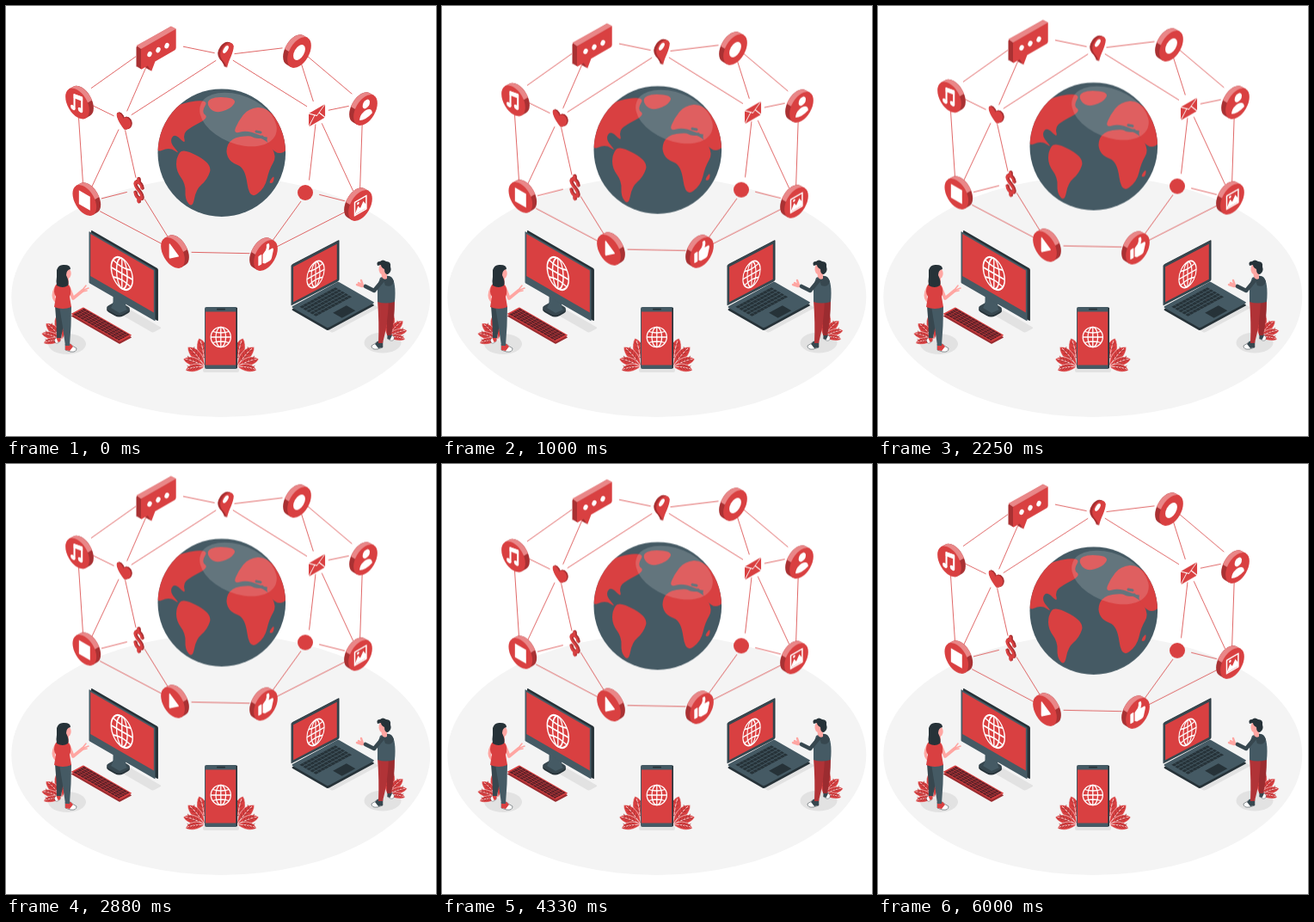
Recreate the animation shown at these times as an HTML page. Size 500 by 500 pixels, loop 6040 ms.

```html
<!DOCTYPE html>
<html lang="en">
<head>
<meta charset="utf-8">
<title>Connected world</title>
<style>
html, body { margin: 0; width: 100%; height: 100%; overflow: hidden; background: #fff; }
svg { display: block; width: 100vw; height: 100vh; }
</style>
</head>
<body>
<svg id="stage" viewBox="0 0 500 500" xmlns="http://www.w3.org/2000/svg"></svg>
<script>
const RED = '#d94041', DEEP = '#a93133', PINK = '#e98788', WINE = '#9b2c30';
const SLATE = '#455a64', DARK = '#37474f', INK = '#263238', SKIN = '#ffa6a2', SHADE = '#e2e2e2';
const LOOP = 6040, RISE = 10;

const path = (d, fill, extra = '') => `<path d="${d}" fill="${fill}" ${extra}/>`;
const line = (d, color, width, extra = '') =>
  path(d, 'none', `stroke="${color}" stroke-width="${width}" stroke-linecap="round" stroke-linejoin="round" ${extra}`);
const rect = (x, y, w, h, fill, r = 0) =>
  `<rect x="${x}" y="${y}" width="${w}" height="${h}" rx="${r}" fill="${fill}"/>`;
const oval = (x, y, rx, ry, fill, turn = 0, extra = '') =>
  `<ellipse cx="${x}" cy="${y}" rx="${rx}" ry="${ry}" fill="${fill}" transform="rotate(${turn} ${x} ${y})" ${extra}/>`;
const group = (transform, body) => `<g transform="${transform}">${body}</g>`;
const repeat = (n, make) => Array.from({ length: n }, (_, i) => make(i)).join('');

// The three isometric planes: two upright faces and the ground.
const left = (x, y) => `matrix(.866 .5 0 1 ${x} ${y})`;
const right = (x, y) => `matrix(.866 -.5 0 1 ${x} ${y})`;
const flat = (x, y) => `matrix(.87 -.47 .87 .5 ${x} ${y})`;

// Solid body: dark copies stepping back from a red face.
const solid = (plane, x, y, dx, dy, shape) =>
  repeat(6, i => group(plane(x + dx * (1 - i / 5), y + dy * (1 - i / 5)), shape(i < 5 ? DEEP : RED)));

// Closed smooth outline that bends towards each key point.
function blob(text, fill) {
  const p = text.split(' ').map(s => s.split(',').map(Number));
  const mid = i => p[i].map((v, k) => (v + p[(i + 1) % p.length][k]) / 2).join(' ');
  return path(`M${mid(p.length - 1)}` + p.map((q, i) => `Q${q.join(' ')} ${mid(i)}`).join('') + 'Z', fill);
}

/* ---------- globe ---------- */
const lands = [
  '172,172 176,128 205,112 236,109 227,123 236,130 213,142 206,149 209,161 196,148 190,158 203,173 190,164',
  '232,111 245,105 269,108 261,120 241,125',
  '198,176 206,165 240,184 234,202 221,213 217,235 208,225 209,207 198,192',
  '255,169 261,154 284,150 304,156 315,175 306,190 301,212 283,225 278,188 261,182',
  '299,153 320,140 330,166 315,174',
  '264,149 270,134 282,119 303,117 328,145 308,156 281,144',
  '305,206 312,196 311,206'
];
const globe = `
  <clipPath id="disc"><circle cx="250.8" cy="170.7" r="74.3"/></clipPath>
  <circle cx="250.8" cy="170.7" r="74.3" fill="${SLATE}"/>
  <g clip-path="url(#disc)">
    ${lands.map(c => blob(c, RED)).join('')}
    ${line('M284 149Q291 154 298 152M291 146L296 147', SLATE, 3)}
    ${oval(270, 132, 47, 28, '#fff', 22, 'opacity=".16"')}
  </g>`;

/* ---------- links ---------- */
// Each node: place the lines aim at, and the clear radius around it.
const nodes = {
  bubble: [176, 41, 31], pin: [254, 57, 12], friend: [337, 47, 16], user: [415, 113, 17],
  mail: [361.5, 124, 14], photo: [411, 231, 18], bird: [351, 216, 14], like: [299, 288, 16],
  play: [199, 286, 17], dollar: [154, 213, 14], square: [91, 229, 21], music: [83, 107, 20], heart: [136, 133, 12]
};
const links = ['bubble pin music heart', 'pin friend mail heart', 'friend mail user', 'user mail photo',
  'mail photo bird', 'bird photo like', 'like photo play', 'play dollar square', 'square dollar heart music',
  'heart dollar music'];

function link(a, b) {
  const [ax, ay, ar] = nodes[a], [bx, by, br] = nodes[b];
  const d = Math.hypot(bx - ax, by - ay), at = s => `${ax + (bx - ax) * s / d} ${ay + (by - ay) * s / d}`;
  return `M${at(ar)}L${at(d - br)}`;
}
const web = links.map(row => {
  const [from, ...ends] = row.split(' ');
  return ends.map(to => link(from, to)).join('');
}).join('');

/* ---------- coins ---------- */
const R = 16, BACK = 5.8;
function rim(from, to, fill) {
  const at = (deg, push) => {
    const a = deg * Math.PI / 180;
    return `${R * Math.cos(a) + push} ${R * Math.sin(a) - push}`;
  };
  return path(`M${at(from, 0)}L${at(from, BACK)}A${R} ${R} 0 0 1 ${at(to, BACK)}L${at(to, 0)}Z`, fill);
}
const blank = rim(-135, 45, DEEP) + rim(-135, -30, PINK) + `<circle r="${R}" fill="${RED}"/>`;
const coinLeft = (x, y, icon) => group(left(x, y), blank + icon);
const coinRight = (x, y, icon) => group(right(x, y), group('scale(-1 1)', blank) + icon);

const note = line('M-4 7V-8L6-10V5', '#fff', 2.4) + path('M-5-9L7-11V-6L-5-4Z', '#fff') +
  oval(-6, 7.5, 3.2, 2.7, '#fff') + oval(4, 5.5, 3.2, 2.7, '#fff');
const person = oval(1, -6.5, 4.8, 4.8, '#fff') + path('M-8 8C-8-2 9-2 9 8Q0 12-8 8Z', '#fff');
const picture = line('M-7.500-7.500H8V8H-7.500Z', '#fff', 1.7) +
  path('M-7 6L-3-1L0 3L4-3L8 3V7H-7Z', '#fff') + oval(-3, -4, 1.5, 1.5, '#fff');
const thumb = rect(-10, -4, 4.6, 11.5, '#fff', 1) +
  path('M-4 7V-3L0-6Q1.500-8 1-12Q5-14 5-8L4-4H9Q11-3 10 0L8 7Q7.500 9 5 9H-1Z', '#fff');

const coins = coinLeft(83, 113.5, note) + coinLeft(91.3, 226, rect(-7.5, -8, 15, 16, '#fff')) +
  coinLeft(194, 287, line('M-4-7.500L7 0L-4 7.500Z', '#fff', 2, 'style="fill:#fff"')) +
  coinRight(341, 54, oval(0, 0, 8, 8, '#fff')) + coinRight(418, 121, person) +
  coinRight(412, 232, picture) + coinRight(302, 290, thumb);

/* ---------- loose icons ---------- */
const bubble = solid(right, 157, 50, -5.5, -3, c => path('M1 0H46Q47 0 47 1V22Q47 24 45 24H19L14 33L9 24H1Q0 24 0 23V1Z', c)) +
  path('M151.500 46L192 23.500L198 26.500L157 50Z', PINK) +
  repeat(3, i => oval(167 + 10 * i, 56 - 4.9 * i, 2.5, 3.4, '#fff', 24));
const pin = solid(right, 257, 52, -3, -1, c => path('M0 20C-2 11-9 7-9-1A9.500 10.500 0 0 1 9-1C9 7 2 12 0 20Z', c)) +
  oval(255.5, 50.5, 2.3, 5, '#fff', 32);
const heart = solid(left, 136.5, 135, 1.5, -.7, c =>
  path('M1 8C-4 5-9 0-9-4C-9-9-2-9 0-4C2-9 10-9 10-3C10 2 6 6 1 8Z', c));
const dollar = solid(left, 153.8, 214.5, 1.5, -.7, c =>
  line('M4.500-5C4-11-4.500-10-4.500-5C-4.500 0 4.500 0 4.500 5.500C4.500 10.500-4 10.500-4.500 5M0-13V-9M0 9.500V13', c, 3.4));
const mail = group(right(352, 125), rect(0, 0, 22, 15.5, RED, 1) + line('M0 0L11 8L22 0M0 15.500L8 6M22 15.500L14 6', '#fff', 1));

const network = line(web, RED, .8) + globe + coins + bubble + pin + heart + dollar + mail + oval(348, 217, 9, 9, RED);

/* ---------- devices ---------- */
const wire = `<g fill="none" stroke="#fff" stroke-width="1.300"><circle r="11.600"/><ellipse rx="5.800" ry="11.600"/>
  <path d="M0-11.600V11.600M-11.600 0H11.600M-9.500-6.500Q0-3.500 9.500-6.500M-9.500 6.500Q0 3.500 9.500 6.500"/></g>`;
const keys = (d, color, width) =>
  line(d, color, width, 'style="stroke-linecap:butt" stroke-dasharray="4 .5"');

const monitor = group(flat(122, 352), rect(0, 0, 12, 56, SHADE, 2)) +
  group(flat(114, 353), rect(0, 0, 18, 20, INK, 6)) + group(flat(114, 351), rect(0, 0, 18, 20, DARK, 6)) +
  path('M124 332L140 341Q138 351 141 353L132 357L122 351Q126 346 124 332Z', SLATE) +
  group(left(99, 260.5), rect(0, 0, 90, 61, INK, 1.5)) +
  group(left(96.5, 262), rect(0, 0, 89, 60, SLATE, 1) + rect(2, 2, 85, 49, RED)) +
  group('matrix(1.080 .62 0 1.520 134.800 311)', wire);

const keyboard = group(flat(75.5, 360.5), rect(0, 0, 16.5, 65, WINE, 1)) +
  group(flat(75.5, 358), rect(0, 0, 16.5, 65, RED, 1) + keys(repeat(5, i => `M${2.4 + 2.9 * i} 2V63`), '#5a2027', 2.4));

const phone = rect(229, 421, 42, 5, SHADE, 2) + rect(231, 350, 38, 72, SLATE, 2) + rect(232, 355.5, 35.5, 62, RED) +
  rect(245, 351.8, 10, 1.7, INK, .8) + rect(267.5, 351, 1.5, 70, INK) + group('translate(249.800 385)', wire);

const laptop = group(flat(336, 355), rect(0, 0, 62, 50, SHADE, 2)) + group(flat(331.5, 353), rect(0, 0, 63, 49, INK, 2)) +
  group(flat(331.5, 350), rect(0, 0, 63, 49, SLATE, 2) + keys(repeat(5, i => `M6 ${7 + 4.6 * i}H54`), INK, 3.6) +
    rect(22, 34, 18, 12, INK)) +
  group('matrix(.866 -.45 0 1 332.500 300.500)', rect(0, 0, 63.5, 47, INK, 1)) +
  group('matrix(.866 -.45 0 1 331.500 301.500)', rect(0, 0, 63.5, 47, DARK, 1) + rect(3, 3, 58.5, 41, RED)) +
  group('matrix(.87 -.5 0 1.240 360 312)', wire);

/* ---------- plants ---------- */
function leaf(len, turn, w) {
  const ribs = repeat(4, i => {
    const y = -len * (.3 + .15 * i);
    return `M${-w * .45} ${y - 3}L0 ${y}L${w * .45} ${y - 3}`;
  });
  return group(`rotate(${turn})`,
    path(`M0 0C${w} ${-len * .3} ${w} ${-len * .85} ${-w * .4} ${-len}C${-w * 1.1} ${-len * .8} ${-w} ${-len * .3} 0 0Z`,
      RED, 'stroke="#f4f4f4" stroke-width=".5"') +
    line(`M0 0Q1 ${-len * .6} ${-w * .2} ${-len * .9}`, '#fff', .7) + line(ribs, DEEP, .8));
}
const fan = repeat(4, i => leaf(33 - 3.5 * i, -6 - 30 * i, 8 - i * .8));
const plants = group('translate(231 419)', fan) + group('translate(269 419) scale(-1 1)', fan) +
  group('translate(65 388) scale(.95 .85)', fan) + group('translate(444 384) scale(-.9 .8)', fan);

/* ---------- people ---------- */
const shoe = (x, y, flip, sole, top) => group(`translate(${x} ${y}) scale(${flip} 1)`,
  path('M-4-5H2Q5-2 9 0Q9 5 2 4L-4 2Z', sole, `stroke="${INK}" stroke-width=".5"`) + path('M-4-5H2L5-2L1 3L-4 2Z', top));

const woman = shoe(61, 388, -.5, '#fff', RED) + shoe(73, 398, 1, '#fff', RED) +
  path('M57 349H70Q68 366 64 386H59Q59 368 57 349Z', DARK) + path('M62 349H76Q76 372 74 395H69Q66 372 62 349Z', SLATE) +
  line('M58 327Q53 337 57 342L63 348', SKIN, 3.4) +
  line('M73 327L78 340L89 331', SKIN, 3.6) + line('M88 331L96 328M89 330L93 325M89 332L94 331', SKIN, 1.6) +
  path('M58 324Q66 319 73 324Q77 331 74 338L76 350Q66 354 56 350L58 338Q54 332 58 324Z', RED) +
  path('M67 314H73V324Q70 327 66 323Z', SKIN) + oval(71.5, 311, 4.2, 6, SKIN) +
  path('M59 307Q61 300 68 301Q75 301 75 306Q70 307 70 313Q74 321 72 325Q66 329 59 325Q58 320 59 315Z', INK);

const man = shoe(446, 385, .6, '#fff', DARK) + shoe(434, 395, -1, '#fff', DARK) +
  path('M440 342H452Q452 364 448 383H443Q443 364 440 342Z', WINE) +
  path('M432 342H445Q444 370 438 392H433Q434 368 432 342Z', '#b13337') +
  line('M416 326L410 322M415 325L413 319M414 326L408 324', SKIN, 2.4) +
  path('M435 316Q442 312 448 315Q454 321 452 344Q441 347 432 344Q432 332 432 325Z', SLATE) +
  path('M438 316Q446 310 451 320Q449 328 441 325Z', DARK) + line('M438 319L428 331L418 326', DARK, 4.6) +
  path('M436 308H443V317Q439 319 437 315Z', SKIN) + oval(437.5, 306, 4, 6, SKIN) +
  path('M432 302Q430 297 435 297Q438 294 442 297Q448 297 447 303Q449 309 444 312Q440 312 440 306Q436 304 436 301Z', INK);

/* ---------- scene ---------- */
document.getElementById('stage').innerHTML = oval(249.8, 338, 243.5, 140, '#f4f4f4') +
  `<g id="network">${network}</g>` + oval(71, 393, 22, 12, SHADE) + oval(438, 391.5, 21.5, 12, SHADE) +
  plants + monitor + keyboard + phone + laptop + woman + man;

document.getElementById('network').animate(
  [0, -RISE, 0].map(y => ({ transform: `translate(0px, ${y}px)` })),
  { duration: LOOP, iterations: Infinity, easing: 'linear' });
</script>
</body>
</html>
```
